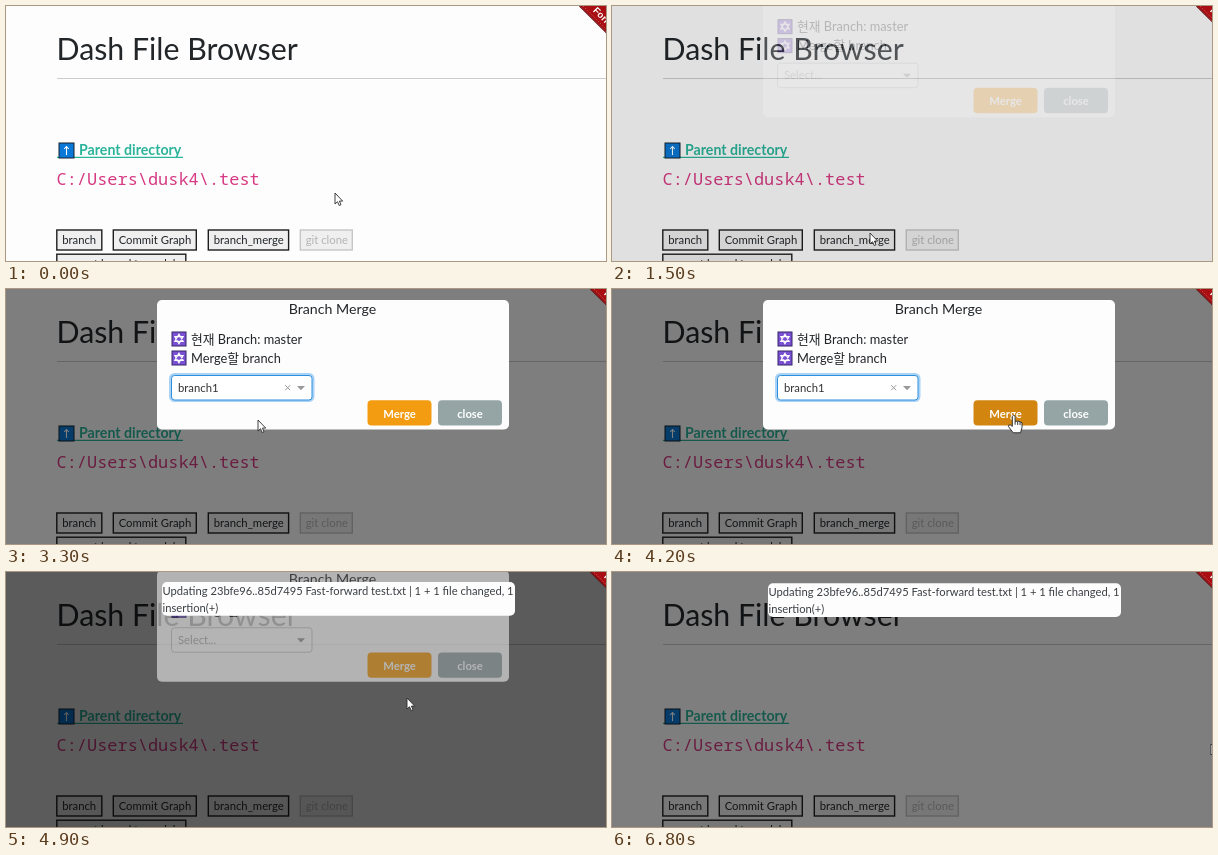
Recreate the animation shown at these times as an HTML page. Size 600 px wide and 255 px high, loop 8200 ms.

```html
<!DOCTYPE html>
<html lang="en">
<head>
<meta charset="utf-8">
<title>File browser: branch merge</title>
<style>
  html, body { margin: 0; width: 100%; height: 100%; overflow: hidden; background: #fefdfe; }
  svg { display: block; width: 100vw; height: 100vh; }
  text { font: 11.3px Lato, "Noto Sans CJK KR", "Noto Sans CJK", sans-serif; fill: #222629; white-space: pre; }
  .heading { font-size: 30.3px; }
  .link { font-size: 14.2px; font-weight: 700; fill: #2bb49a; }
  .path { font: 16.95px "Noto Sans Mono", "DejaVu Sans Mono", monospace; fill: #d63a82; }
  .ribbon { font: 700 9.5px "Liberation Sans", Arial, sans-serif; fill: #fff; }
  .key rect { fill: #efeff0; stroke: #1e1e1e; stroke-width: 1.4; }
  .key.off rect { stroke: #c6c6c6; }
  .key.off text { fill: #b4b4b4; }
  .title { font-size: 14.2px; text-anchor: middle; }
  .row { font-size: 12.8px; }
  .action { font-weight: 700; fill: #fff; text-anchor: middle; }
  .message { font-size: 11.2px; fill: #3a3f43; }
  .panel { fill: #fefdfe; }
</style>
</head>
<body>
<svg viewBox="0 0 600 255" preserveAspectRatio="none">
  <defs>
    <g id="star">
      <rect x="-7" y="-7" width="14" height="14" fill="#7a50d2" stroke="#35266b"/>
      <path d="M0-4.8L4.2 2.4H-4.2ZM0 4.8L4.2-2.4H-4.2Z" fill="none" stroke="#fff" stroke-width="1.1"/>
    </g>
  </defs>

  <rect width="600" height="255" fill="#fefdfe"/>
  <text class="heading" x="50.5" y="54">Dash File Browser</text>
  <path d="M51 72.5H600" stroke="#cdcccd"/>
  <path d="M51 151.3H177" stroke="#2bb49a" stroke-width="1.2"/>
  <rect x="53" y="137" width="15" height="15" fill="#0a78d6" stroke="#14202c"/>
  <path d="M60.5 149V140.5M58.2 143L60.5 140.5L62.8 143" fill="none" stroke="#fff" stroke-width="1.1"/>
  <text class="link" x="73" y="149.4">Parent directory</text>
  <text class="path" x="50.5" y="179">C:/Users\dusk4\.test</text>
  <g id="keys"></g>

  <rect id="mergeShade" width="600" height="255"/>
  <rect id="resultShade" width="600" height="255"/>

  <g id="ribbon">
    <path d="M574 0L600 26L640 66V0Z" fill="#a80e12"/>
    <path d="M573.5 0L640 66.5" stroke="#6e0f12" stroke-width="1.2"/>
    <path d="M577 0L640 63" stroke="#c86a6a" stroke-width=".7" stroke-dasharray="1.5 1.5"/>
    <text class="ribbon" transform="translate(586.5 5) rotate(45)">Fork me</text>
  </g>

  <g id="merge">
    <rect id="mergePanel" class="panel" x="151" y="11" width="352" height="129.5" rx="5"/>
    <text class="title" x="326.5" y="24.7">Branch Merge</text>
    <g id="currentRow">
      <use href="#star" x="173" y="50"/>
      <text class="row" x="185" y="54.5">현재 Branch: master</text>
    </g>
    <g id="form">
      <use href="#star" x="173" y="69"/>
      <text class="row" x="185" y="73.7">Merge할 branch</text>
      <rect id="glow" x="164.5" y="85.5" width="142.5" height="26" rx="4" fill="none" stroke="#a9d2f5" stroke-width="3"/>
      <rect id="select" x="165.5" y="86.5" width="140.5" height="24.5" rx="3" fill="#fff"/>
      <text id="value" x="172" y="102.7"></text>
      <path id="clear" d="M279.2 96.2l5 5m0-5l-5 5" stroke="#999" stroke-width="1"/>
      <path d="M291 97H299L295 101.2Z" fill="#999"/>
      <g id="mergeButton">
        <rect x="361.5" y="111.2" width="64" height="25.3" rx="4"/>
        <text class="action" x="393.5" y="128.7">Merge</text>
      </g>
      <g id="closeButton">
        <rect x="432" y="111.2" width="64" height="25.3" rx="4"/>
        <text class="action" x="464" y="128.7">close</text>
      </g>
      <g id="menu">
        <rect x="165.5" y="111" width="140.5" height="26" fill="#fff" stroke="#ccc"/>
        <rect id="option" x="166" y="111.5" width="139.5" height="25" fill="#ebf5ff"/>
        <text x="172" y="127.7">branch1</text>
      </g>
    </g>
  </g>

  <g id="result">
    <rect class="panel" x="156" y="11.2" width="353" height="33.8" rx="5"/>
    <text class="message" x="156.5" y="24.2">Updating 23bfe96..85d7495 Fast-forward test.txt | 1 + 1 file changed, 1</text>
    <text class="message" x="156.5" y="41.2">insertion(+)</text>
  </g>

  <g id="cursor" stroke="#2c2c2c" stroke-width=".9" stroke-linejoin="round" fill="#fff">
    <path id="arrow" d="M0 0V11L2.5 8.7L4.2 12.5L6 11.7L4.4 8.1H7.7Z"/>
    <path id="hand" transform="translate(-.7 0) scale(1.08)" d="M0 1.2Q1.3-.8 2.6 1.2V6L5 5.6L7.3 6.3L9 7.2V11.5L7.6 16.5H.8L-3.6 10.6Q-3.6 8.4-1.6 9.3L0 10.6ZM2.6 6V9M5 6V9.2M7.2 6.6V9.4"/>
  </g>
</svg>
<script>
const LOOP = 8200, STEP = 100;
const OPEN = 1466, MENU_OPEN = 2600, PICK = 3200, SUBMIT = 4400, RESULT = 4641, CLOSE = 4832;

// time, x, y of the pointer tip
const TRACK = [
  [0, 329, 187], [1300, 258, 227], [1800, 258, 227], [2400, 262, 100], [2700, 262, 100],
  [3100, 252, 131], [3300, 252, 131], [3800, 452, 122], [4200, 401, 126], [6400, 401, 126], [6800, 599, 172]
];

const $ = id => document.getElementById(id);
const clamp = v => Math.max(0, Math.min(1, v));
const attr = (id, values) => {
  for (const name in values) $(id).setAttribute(name, values[name]);
};
const show = (id, visible) => attr(id, { visibility: visible ? "visible" : "hidden" });
const fade = (t, start) => clamp((t - start) / 150);
const slide = (t, start) => 36 * (1 - clamp((t - start) / 300)) ** 1.7;
const inside = ([x, y], left, top, right, bottom) => x >= left && x <= right && y >= top && y <= bottom;

$("keys").innerHTML = [
  ["branch", 50.8, 224, 45], ["Commit Graph", 107.3, 224, 83], ["branch_merge", 202.3, 224, 80.3],
  ["git clone", 294.3, 224, 52], ["current branch's model", 50.8, 248.2, 129]
].map(([label, x, y, width]) =>
  `<g class="key ${label === "git clone" ? "off" : ""}"><rect x="${x}" y="${y}" width="${width}" height="20"/>` +
  `<text x="${x + 5.4}" y="${y + 14.2}">${label}</text></g>`).join("");

function pointerAt(t) {
  const next = TRACK.findIndex(point => point[0] > t);
  if (next < 0) return TRACK.at(-1).slice(1);
  const [t0, x0, y0] = TRACK[next - 1], [t1, x1, y1] = TRACK[next];
  const p = (t - t0) / (t1 - t0), e = p * p * (3 - 2 * p);
  return [x0 + (x1 - x0) * e, y0 + (y1 - y0) * e];
}

function draw(t) {
  const pointer = pointerAt(t);
  const closing = t >= CLOSE;
  const picked = t >= PICK && !closing;
  const menuOpen = t >= MENU_OPEN && t < PICK;
  const focused = t >= MENU_OPEN && t < SUBMIT;
  const formLive = t >= OPEN && t < RESULT;
  const overMerge = inside(pointer, 361, 111, 425, 137);
  const overClose = inside(pointer, 432, 111, 496, 137);
  const overOption = menuOpen && inside(pointer, 165, 112, 306, 137);

  const mergeFade = fade(t, OPEN) - fade(t, CLOSE);
  const mergeShift = closing ? slide(t, CLOSE) - 36 : -slide(t, OPEN);
  attr("mergeShade", { opacity: mergeFade / 2 });
  attr("merge", { opacity: mergeFade, transform: `translate(0 ${mergeShift})` });
  attr("resultShade", { opacity: fade(t, RESULT) / 2 });
  attr("result", { opacity: fade(t, RESULT), transform: `translate(0 ${-slide(t, RESULT)})` });
  attr("ribbon", { transform: `translate(${t >= OPEN ? 11 : 0} 0)` });

  // the first row disappears while the dialog closes
  show("currentRow", !closing);
  attr("form", { transform: `translate(0 ${closing ? -18 : 0})` });
  attr("mergePanel", { height: closing ? 111.5 : 129.5 });

  $("value").textContent = picked ? "branch1" : "Select...";
  $("value").style.fill = picked ? "#333" : "#aaa";
  show("clear", picked);
  show("glow", focused);
  show("menu", menuOpen);
  attr("option", { opacity: overOption ? 1 : 0 });
  attr("select", { stroke: focused ? "#2f8fdf" : "#c9c9c9" });
  attr("mergeButton", { fill: overMerge && !closing ? "#d2860f" : "#f39c12" });
  attr("closeButton", { fill: overClose && formLive ? "#7b8d8e" : "#95a5a6" });

  const overKey = t < OPEN && inside(pointer, 202, 224, 283, 244);
  const hand = overKey || overOption || formLive && (overMerge || overClose);
  attr("cursor", { transform: `translate(${pointer.join(" ")})` });
  show("arrow", !hand);
  show("hand", hand);
}

const start = performance.now();
function tick() {
  const t = (performance.now() - start) % LOOP;
  draw(Math.floor(t / STEP) * STEP);
  requestAnimationFrame(tick);
}
tick();
</script>
</body>
</html>
```
